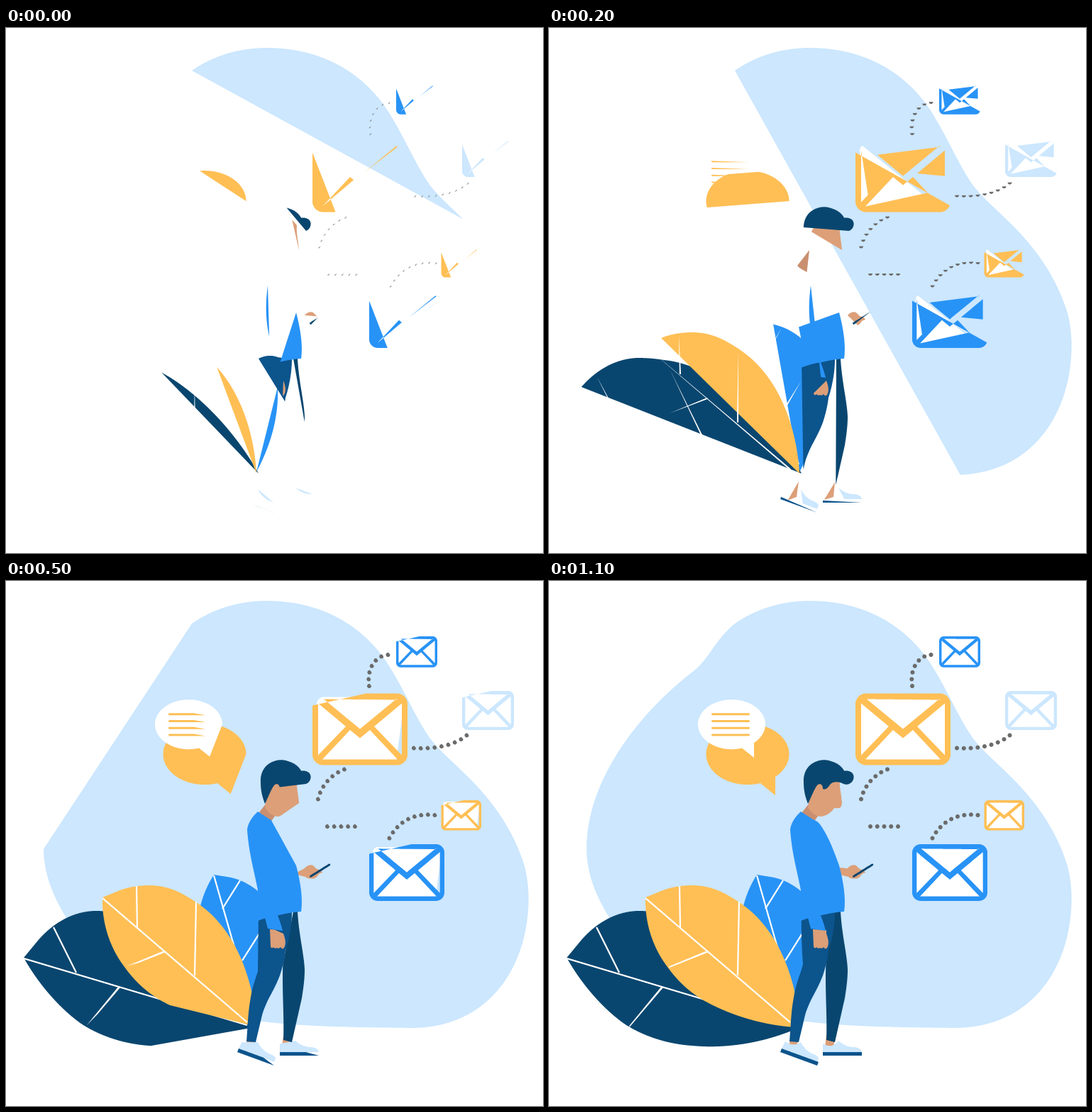
Animation, 757 px wide and 740 px high, one loop 1600 ms. Source, as an HTML page with a canvas:

```html
<!DOCTYPE html>
<html lang="en">
<head>
<meta charset="utf-8">
<title>Messages</title>
<style>
  html, body { margin: 0; width: 100%; height: 100%; overflow: hidden; background: #fff; }
  canvas { display: block; }
</style>
</head>
<body>
<canvas id="stage" width="757" height="740"></canvas>
<script>
const ctx = document.getElementById('stage').getContext('2d');
const PALE = '#cce7fe', BLUE = '#2893f6', YELLOW = '#ffbf55', NAVY = '#09466f',
      DENIM = '#0c548c', SKIN = '#dc9f78', NECK = '#c98f70', GREY = '#6b6b6b', WHITE = '#fff';
const LOOP = 1600, STEP = 20;

const probe = document.createElementNS('http://www.w3.org/2000/svg', 'path');
const shapes = [];

// Points along a path, evenly spaced by length
function sample(d, count) {
  probe.setAttribute('d', d);
  const len = probe.getTotalLength();
  const n = count || Math.ceil(len * 2);
  return Array.from({ length: n + 1 }, (_, i) => probe.getPointAtLength(len * i / n));
}

// A filled shape whose outlines are traced over time
function shape(color, ...paths) {
  shapes.push({ color, paths: paths.map(d => sample(d)) });
}

// A thin white bar, traced across its first end and then along its sides
function vein(x1, y1, x2, y2) {
  const k = 1.1 / Math.hypot(x2 - x1, y2 - y1);
  const dx = (y2 - y1) * k, dy = (x1 - x2) * k;
  shape(WHITE, `M${x1 - dx} ${y1 - dy}L${x1 + dx} ${y1 + dy}L${x2 + dx} ${y2 + dy}L${x2 - dx} ${y2 - dy}Z`);
}

function dots(d, n) {
  for (const { x, y } of sample(d, n - 1)) {
    shape(GREY, `M${x + 3} ${y}a3 3 0 0 1 -6 0a3 3 0 0 1 6 0`);
  }
}

function envelope(x, y, w, color) {
  const add = (fill, ...paths) => {
    shape(fill, ...paths);
    const s = w / 134;
    for (const pts of shapes[shapes.length - 1].paths) {
      pts.forEach((p, i) => { pts[i] = { x: x + p.x * s, y: y + p.y * s }; });
    }
  };
  add(WHITE, 'M118 95H16A10 10 0 0 1 6 85V15A10 10 0 0 1 16 5H118A10 10 0 0 1 128 15V85A10 10 0 0 1 118 95');
  add(color,
    'M0 17V86A15 15 0 0 0 15 101H119A15 15 0 0 0 134 86V15A15 15 0 0 0 119 0H15A15 15 0 0 0 0 15Z',
    'M14 93L53 51.5L67 63L81 51.5L120 93Z',
    'M120 9L118 8L67 50L16 8Z',
    'M87 46.5L126 14V87Z',
    'M8 14V87L47 46.5Z');
}

// Background
shape(PALE, 'M262 60C294 38 330 28 368 28C435 28 492 55 530 105C556 140 575 190 598 222' +
  'C612 240 630 255 645 270C685 308 715 350 731 402C737 425 738 450 735 475C725 560 670 630 571 630' +
  'C500 629 430 629 362 621C300 612 240 602 191 585C140 560 105 515 84 473C64 440 53 410 53 376' +
  'C53 290 115 195 205 126C225 110 235 82 262 60');

// Leaves
shape(BLUE, 'M353 626C372 590 385 550 383 505C380 470 368 452 354 436C342 427 330 420 312 417' +
  'L293 414C283 430 278 443 274 458C275 520 310 590 353 626');
vein(352, 615, 319, 506);
vein(319, 506, 293, 415);
vein(305, 462, 330, 422);
vein(333, 535, 357, 497);

shape(NAVY, 'M356 628C330 580 280 520 222 487C203 477 183 470 162 468C150 466 138 465 125 465' +
  'C92 466 64 484 44 508L25 531C45 567 75 602 106 624C135 643 170 653 202 655' +
  'C255 660 310 649 356 628');
vein(340, 626, 25, 532);
vein(99, 552, 67, 488);
vein(223, 590, 170, 478);
shape(WHITE, 'M113.5 626.5L159 571L161 573L112.5 630Z');

shape(YELLOW, 'M353 628C350 570 330 515 299 480C288 467 274 456 259 447C240 435 222 429 202 429' +
  'C185 429 170 432 158 437L136 446C135 480 145 515 167 544C185 569 205 585 229 597' +
  'C265 615 305 626 346 629Z');
vein(340, 622, 136, 447);
vein(185, 488, 184, 430);
vein(266, 556, 268, 452);
shape(WHITE, 'M170 543L223 521L224.5 523.3L168.5 545.5Z');

// Speech bubbles
shape(YELLOW, 'M338.5 244A58.5 43 0 1 0 298 285L319 302V276A58.5 43 0 0 0 338.5 244');
shape(WHITE, 'M305 202A47.5 35 0 1 0 272 235.5L289 249V228A47.5 35 0 0 0 305 202');
for (let i = 0; i < 4; i++) {
  const y = 189.3 + i * 9.7;
  shape(YELLOW, `M281.5 ${y}H230.5a1.5 1.5 0 0 1 0 -3H281.5a1.5 1.5 0 0 1 0 3`);
}

// Mail
envelope(432, 158.5, 134, YELLOW);
envelope(512, 371, 106, BLUE);
envelope(550, 78, 58, BLUE);
envelope(643, 155, 73, PALE);
envelope(613.5, 309, 56.5, YELLOW);
dots('M538.5 104C522 105 508 122 512 148', 7);
dots('M575 235.5C601 237 631 233 649.5 217.5', 9);
dots('M477 265.5C459 272 444 289 440 307.5', 7);
dots('M453 346H492', 5);
dots('M604.5 330C573 326 552 341 540.5 362.5', 9);

// Feet
shape(SKIN, 'M352 639L349 661L336 666L341 640Z');
shape(SKIN, 'M403 640L401 661L388 665L391 640Z');
shape(PALE, 'M355 650C359 658 365 664 373 667Q380 670 380 673L378 678L328 659L333 649Q345 657 355 650');
shape(DENIM, 'M378 683L326 664L328 659L380 678Z');
shape(PALE, 'M408 648C415 654 422 657 430 657Q440 658 441 664H386V652Q399 660 408 648');
shape(DENIM, 'M441 669H386V664H441Z');

// Legs
shape(NAVY, 'M405 466L411 466C413 500 420 525 421 548C421 562 419 575 417 588L403 650L391 647' +
  'C392 617 390 590 390 560C390 525 393 495 398 466');
shape(DENIM, 'M356 466Q370 459 383 464L403 467C403 486 399 506 394 521Q392 538 386 556' +
  'C377 580 366 592 361 612L352 650L339 649C341 625 341 608 345 587C348 567 355 553 358 540Q355 500 356 466');

// Upper body
shape(SKIN, 'M391 497C394 505 395.5 513 391 518Q389 519 387 516Q384 519 382 517Q379 519 377.5 516Q374 519 373 515L372 491L391 492Z');
shape(SKIN, 'M421 405C425 400 431 399 434 402L438 406Q444 407 446 411L441 413Q437 420 432 419.5' +
  'Q425 420 422 417L410 414V404Z');
shape(NAVY, 'M430.5 417.5C428.8 418.5 427 416.5 428.8 415L455 398.7C457 398 458 400 456.5 401.2Z');
shape(NECK, 'M367 313L350 335L353 338L368 347L380 330Z');
shape(BLUE, 'M409 401C414 420 419 445 416 466Q401 467 385 471Q370 473 355 479L355 436' +
  'C349 405 342 382 340 350Q342 337 355 325L372 336Q378 338 382 343C394 360 401 379 409 401');
shape(BLUE, 'M369 363C366 385 365 412 372 438C376 458 385 472 390 493L369 490L356 440L352 380Z');

// Head
shape(SKIN, 'M413 313C412 300 409 290 410 278L404 271L392 267Q377 273 370 287L365 319' +
  'Q372 331 383 332C392 331 399 325 402 320Q412 321 412 317Z');
shape(NAVY, 'M423 286C428 284 430 279 429.5 275C428.5 269 423 267 416 267.5C412 260 405 256 396 253.5' +
  'C390 251.5 383 252 378 254C365 258 358 270 359 284C359 297 362 306 365 314' +
  'C370 304 374 293 378 288C382 284 386 287 386 293C391 295 394 290 397 286C403 281 412 284 415 286Q420 287.5 423 286');

// Traced share of every outline over time
const KEYS = [[0, 0.248], [80, 0.328], [200, 0.483], [360, 0.677], [500, 0.806], [820, 0.955], [1100, 1]];

function slope(i) {
  if (i === KEYS.length - 1) return 0.00006;
  const a = KEYS[Math.max(i - 1, 0)], b = KEYS[i + 1];
  return (b[1] - a[1]) / (b[0] - a[0]);
}

function progress(t) {
  if (t >= 1100) return 1;
  const i = KEYS.findIndex(k => k[0] > t) - 1;
  const [t0, p0] = KEYS[i], [t1, p1] = KEYS[i + 1];
  const h = t1 - t0, u = (t - t0) / h, v = 1 - u;
  return v * v * (1 + 2 * u) * p0 + u * u * (3 - 2 * u) * p1 +
         h * u * v * (v * slope(i) - u * slope(i + 1));
}

function trace(pts, p) {
  const end = p * (pts.length - 1), whole = Math.floor(end);
  ctx.moveTo(pts[0].x, pts[0].y);
  for (let i = 1; i <= whole; i++) ctx.lineTo(pts[i].x, pts[i].y);
  if (whole < pts.length - 1) {
    const a = pts[whole], b = pts[whole + 1], f = end - whole;
    ctx.lineTo(a.x + (b.x - a.x) * f, a.y + (b.y - a.y) * f);
  }
  ctx.closePath();
}

function draw(p) {
  ctx.fillStyle = WHITE;
  ctx.fillRect(0, 0, 757, 740);
  for (const { color, paths } of shapes) {
    ctx.fillStyle = color;
    ctx.beginPath();
    paths.forEach(pts => trace(pts, p));
    ctx.fill('evenodd');
  }
}

const start = performance.now();
let last = -1;
function frame() {
  const t = Math.floor((performance.now() - start) % LOOP / STEP) * STEP;
  const p = progress(t);
  if (p !== last) draw(last = p);
  requestAnimationFrame(frame);
}
frame();
</script>
</body>
</html>
```
